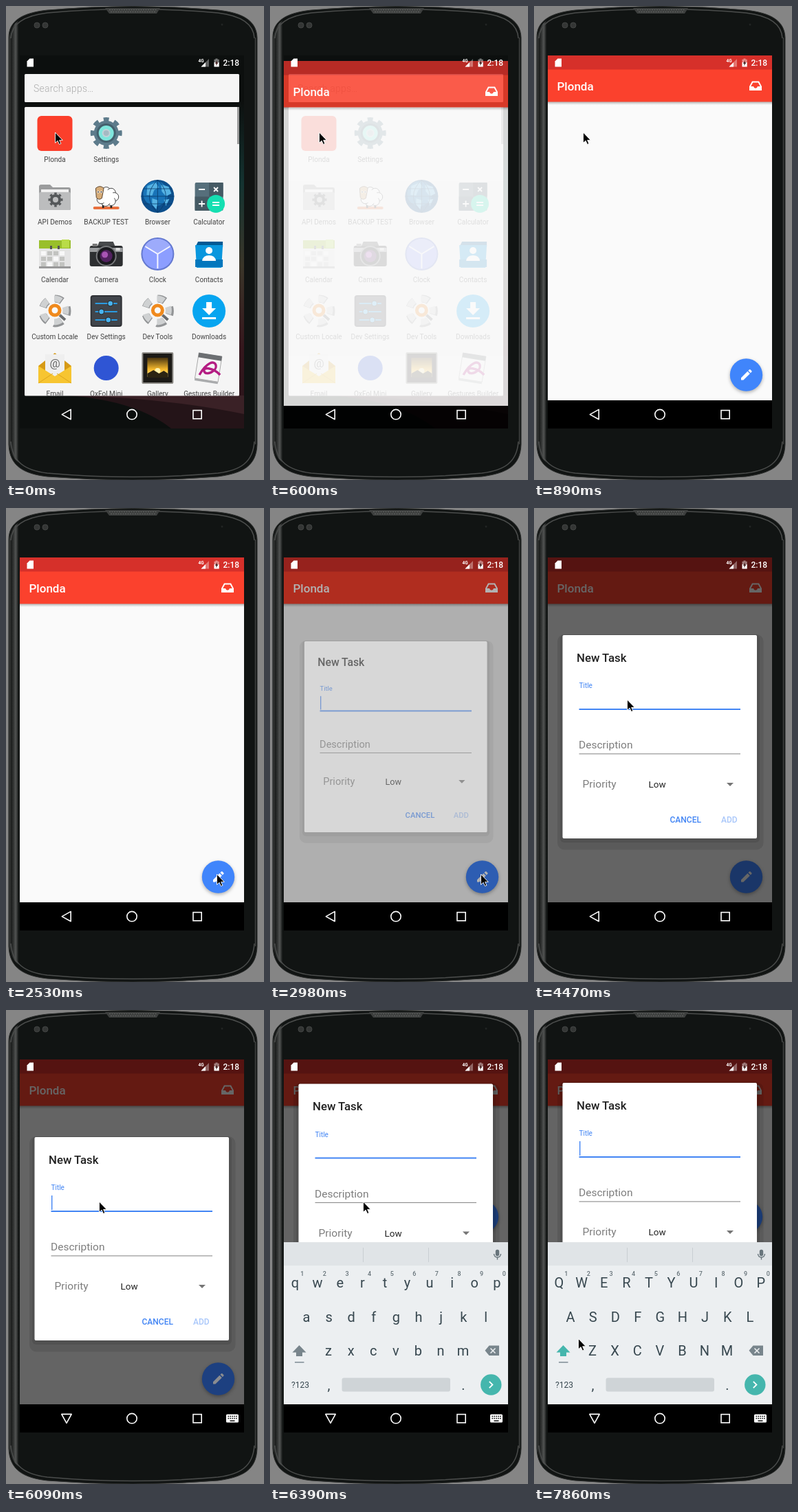
Write an HTML page that moves like this. It is 375 px wide and 690 px high and loops after 8000 ms.

```html
<!DOCTYPE html>
<html lang="en">
<head>
<meta charset="utf-8">
<title>Task app on a phone</title>
<style>
html, body { margin: 0; width: 100%; height: 100%; overflow: hidden; background: #858585; }
svg { display: block; width: 375px; height: 690px; font-family: Roboto, "Noto Sans", sans-serif; }
.mid { text-anchor: middle; }
.med { font-weight: 500; }
#fab circle { filter: drop-shadow(0 2px 2.5px rgba(0,0,0,.3)); }
#dialog { transform-origin: 183px 333px; }
</style>
</head>
<body>
<svg viewBox="0 0 375 690">
  <defs>
    <linearGradient id="rim">
      <stop offset="0" stop-color="#4a4c4b"/><stop offset=".15" stop-color="#1b1d1c"/>
      <stop offset=".4" stop-color="#2c2e2d"/><stop offset=".7" stop-color="#525453"/>
      <stop offset="1" stop-color="#171a19"/>
    </linearGradient>
    <linearGradient id="side" x2="0" y2="1">
      <stop offset="0" stop-color="#0d100f"/><stop offset=".25" stop-color="#143331"/>
      <stop offset=".5" stop-color="#3a3529"/><stop offset=".75" stop-color="#35171d"/>
      <stop offset="1" stop-color="#28141a"/>
    </linearGradient>
    <linearGradient id="drop" x2="0" y2="1">
      <stop offset="0" stop-color="#000" stop-opacity=".3"/><stop offset="1" stop-color="#000" stop-opacity="0"/>
    </linearGradient>
    <linearGradient id="dusk" x2="0" y2="1">
      <stop offset="0" stop-color="#4a3510"/><stop offset=".6" stop-color="#f5b82c"/><stop offset="1" stop-color="#ffe98a"/>
    </linearGradient>
    <clipPath id="screen"><rect x="20" y="72" width="326" height="543"/></clipPath>
    <clipPath id="window"><rect x="20" y="72" width="326" height="502"/></clipPath>
    <clipPath id="drawer"><rect x="27" y="147" width="312" height="420.5"/></clipPath>
  </defs>

  <!-- phone body -->
  <rect width="375" height="690" fill="#858585"/>
  <path d="M4 46C4 21 24 10 60 6Q185-5 308 6C344 10 364 21 365 46V638C364 670 344 680 308 685Q185 695 60 685C26 681 5 670 4 638Z" fill="#111413" stroke="#2b2d2c"/>
  <path d="M5 46Q6 30 18 21V665Q6 654 5 638Z" fill="url(#rim)"/>
  <path d="M7 47C8 25 27 14 60 10Q185-1 308 10C341 14 360 25 361 47M7 634C9 664 28 676 60 680Q185 691 308 680C341 676 359 664 361 634" fill="none" stroke="#4b4d4c" stroke-width="1.5"/>
  <path d="M362.5 46V638" stroke="#404241" stroke-width="1.5"/>
  <path d="M144 3H224L219 11H150Z" fill="#3d3f3e"/>
  <path d="M150 5.5H219M152 8.5H217" stroke="#646665" stroke-dasharray="2 1.5"/>
  <g fill="#343635" stroke="#434544"><circle cx="45" cy="28" r="4"/><circle cx="57" cy="28" r="4"/></g>
  <circle cx="314" cy="27" r="1.5" fill="#222524"/>

  <g clip-path="url(#screen)">
    <g id="home">
      <rect x="20" y="72" width="326" height="543" fill="#0c0f0e"/>
      <rect x="337" y="140" width="9" height="475" fill="url(#side)"/>
      <path d="M92 567Q190 575 240 615H346V567Z" fill="#241418"/>
      <path d="M92 567Q230 570 346 594V567Z" fill="#3a2126"/>
      <rect x="27" y="99" width="312" height="41" rx="1.5" fill="#f5f5f5"/>
      <text x="40" y="125" font-size="14" font-weight="300" letter-spacing=".2" fill="#adadad">Search apps…</text>
      <rect x="27" y="147" width="312" height="420.5" rx="1.5" fill="#f5f5f5"/>
      <rect x="336" y="147" width="3" height="54" fill="#9b9b9b"/>
      <g id="apps" clip-path="url(#drawer)"></g>
    </g>
    <g id="app">
      <rect x="20" y="72" width="326" height="502" fill="#fafafa"/>
      <rect x="20" y="139" width="326" height="5" fill="url(#drop)"/>
      <rect x="20" y="92" width="326" height="47.5" fill="#fb412d"/>
      <rect x="20" y="72" width="326" height="20.5" fill="#d6302a"/>
      <text x="33.5" y="123" font-size="17" class="med" fill="#fff">Plonda</text>
      <path d="M317 109.5H327L331 117V123H313V117ZM318.2 111.5L315.2 117H319Q319.5 119.7 322 119.7T325 117H328.8L325.8 111.5Z" fill="#fff" fill-rule="evenodd"/>
      <rect x="20" y="574" width="326" height="41" fill="#000"/>
    </g>
    <rect id="dim" x="20" y="72" width="326" height="502"/>
    <g id="fab">
      <circle cx="308.5" cy="537" r="23.7"/>
      <path d="M301 541.2L310.4 531.8L313.8 535.2L304.4 544.6H301ZM311.4 530.8L313 529.2Q313.7 528.6 314.4 529.2L316.4 531.2Q317 531.9 316.4 532.6L314.8 534.2Z"/>
    </g>
    <g clip-path="url(#window)">
      <g id="dialog">
        <rect x="34" y="184" width="299.5" height="313.5" rx="10" opacity=".1"/>
        <rect x="38" y="184" width="290" height="303" rx="6" opacity=".1"/>
        <rect x="41.5" y="185" width="282.5" height="296" rx="2" fill="#fff"/>
        <text x="62" y="223.8" font-size="16.8" class="med" fill="#212121">New Task</text>
        <text x="65.5" y="262" font-size="10" fill="#4285f4">Title</text>
        <rect x="65.5" y="292" width="234.5" height="2" fill="#4285f4"/>
        <rect id="caret" x="66" y="270" width="1.4" height="21" fill="#4285f4"/>
        <text x="65" y="350" font-size="15.5" fill="#7d7d7d">Description</text>
        <rect x="65.5" y="357.4" width="234.5" height="1" fill="#808080"/>
        <text x="70.5" y="407" font-size="15.5" fill="#7d7d7d">Priority</text>
        <text x="166.5" y="407" font-size="13.5" fill="#212121">Low</text>
        <path d="M280 400H290L285 405Z" fill="#757575"/>
        <text x="197.5" y="458.4" font-size="12" class="med" fill="#4285f4">CANCEL</text>
        <text x="272" y="458.4" font-size="12" class="med" fill="#a9c7fa">ADD</text>
      </g>
      <g id="board">
        <rect x="20" y="338" width="326" height="236" fill="#eceff1"/>
        <rect x="20" y="338" width="326" height="34" fill="#e0e4e7"/>
        <path d="M135.5 346V367M230.5 346V367" stroke="#c9ced2"/>
        <g fill="none" stroke="#68757c" stroke-width="1.4"><rect x="328.5" y="349.5" width="4" height="8" rx="2" fill="#68757c"/><path d="M325.5 355Q326 360 330.5 360T335.5 355M330.5 360V363.5"/></g>
        <g id="keys"></g>
        <path id="shift" d="M42.5 488L52.5 498.5H47V504H38V498.5H32.5Z"/>
        <rect x="36" y="512" width="13.5" height="1.6" fill="#85929a"/>
        <path d="M318.5 488.5H333V503H318.5L312.5 495.8Z" fill="#78858c"/>
        <path d="M320.5 492.5L327.5 499.5M327.5 492.5L320.5 499.5" stroke="#eceff1" stroke-width="1.6"/>
        <rect x="104.5" y="535.5" width="157.5" height="20" rx="3" fill="#cfd4d7"/>
        <circle cx="321.3" cy="545.5" r="15.2" fill="#45b6ad"/>
        <path d="M318.8 540.8L323.5 545.5L318.8 550.2" fill="none" stroke="#fff" stroke-width="1.8"/>
      </g>
    </g>
    <g fill="#fff">
      <path d="M34.5 76.5H40V88.5H30.5V80.5Z"/>
      <text x="279.5" y="81.5" font-size="6.5" font-weight="700">4G</text>
      <path d="M295 77V88.5H283.5Z" opacity=".35"/><path d="M290 82V88.5H283.5Z"/>
      <path d="M302.5 77.7H304.5V76.5H307.5V77.7H309.7V82H302.5Z" opacity=".45"/>
      <path d="M302.5 82H309.7V88.5H302.5Z"/>
      <path d="M307 79L303.8 83.8H305.8L305 87.2L308.5 82.2H306.4Z" fill="#3a1413"/>
      <text x="315.5" y="87" font-size="12" class="med">2:18</text>
    </g>
    <g fill="none" stroke="#fff" stroke-width="1.6">
      <path id="back" d="M81.3 594.6L94.2 587.4V601.8Z" stroke-linejoin="round"/>
      <circle cx="183" cy="594.6" r="7.2"/>
      <rect x="272" y="588.6" width="12.2" height="12.2"/>
    </g>
    <g id="ime">
      <rect x="320" y="588.5" width="18" height="12" rx="1.5" fill="#fff"/>
      <path d="M322.5 591.5H336M322.5 594.5H336" stroke="#000" stroke-width="1.6" stroke-dasharray="1.6 1.3"/>
      <path d="M325.5 598H332.5" stroke="#000" stroke-width="1.4"/>
    </g>
  </g>
  <path id="mouse" d="M0 0V15.3L3.6 12.1L6 17.4L8.4 16.4L6.1 11.3H10.8Z" stroke="#fff" stroke-width=".9"/>
</svg>

<script>
const $ = id => document.getElementById(id);

// Icon pieces, drawn around 0,0
const disc = (x, y, r, fill, more = '') => `<circle cx="${x}" cy="${y}" r="${r}" fill="${fill}" ${more}/>`;
const box = (x, y, w, h, fill, more = '') => `<rect x="${x}" y="${y}" width="${w}" height="${h}" fill="${fill}" ${more}/>`;
const shape = (d, fill, more = '') => `<path d="${d}" fill="${fill}" ${more}/>`;
const line = (d, color, width) => shape(d, 'none', `stroke="${color}" stroke-width="${width}"`);
const ring = (x, y, r, color, width, more = '') => disc(x, y, r, 'none', `stroke="${color}" stroke-width="${width}" ${more}`);
const teeth = (x, y, r, n, color, width) => ring(x, y, r, color, width, `pathLength="${2 * n}" stroke-dasharray="1 1" stroke-dashoffset=".5"`);
const gear = (x, y, r, n, color, width) => disc(x, y, r, color) + teeth(x, y, r, n, color, width);

const tools = teeth(0, 0, 18, 5, '#929496', 11) + teeth(-1, -1, 17, 5, '#cfd1d2', 9) + line('M5 4L15 13', '#6a6c6e', 4) +
  disc(0, -1, 10, '#fafafa') + ring(0, -1, 7, '#f08a1d', 5);

const wool = [[-8, -4], [0, -8], [8, -6], [13, 1], [8, 8], [-1, 9], [-8, 5]];
const sheep = box(-19, 15, 38, 4, '#e8703f', 'rx="2"') + '<g transform="scale(.9)">' + line('M-5 10V19M8 10V19', '#222', 3) +
  wool.map(([x, y]) => disc(x, y, 7, '#fff', 'stroke="#333"')).join('') + disc(2, 1, 11, '#fff') +
  shape('M-17-13Q-10-19-4-13L-7 3Q-12 7-16 2Z', '#d6ac78', 'stroke="#4d3620"') +
  disc(-13, -7, 2, '#fff') + disc(-8, -7, 2, '#fff') + disc(-13, -7, 1, '#111') + disc(-8, -7, 1, '#111') + '</g>';

const globe = disc(0, 0, 24, '#0d4f8c') + disc(-3, -4, 18, '#1974b8') +
  shape('M-15-15L-3-20L2-13L-5-9L-8-1L-16-2ZM5-17L16-14L20-4L12 0L6-7ZM-8 3L1 6L-2 19L-8 12ZM9 5L17 4L12 14Z', '#55b2e3') +
  line('M-24 0H24M-21-11H21M-21 11H21M0-24V24M0-24Q-24 0 0 24M0-24Q24 0 0 24', '#083a6b', .8);

const calendar = box(-23, -20, 46, 40, '#e4e4e4') + box(-23, -20, 46, 12, '#99bf2b') + box(10, -21, 11, 12, '#b9dc48') +
  [-15, -6, 3, 12].map((x, i) => [-4, 4, 12].map((y, j) => box(x - 5, y, 7, 6, (i + j) % 3 ? '#c2c3c0' : '#f8f8f8')).join('')).join('') +
  box(-7, -12, 3, 5, '#555') + box(4, -12, 3, 5, '#555') + box(-23, 18, 46, 3, '#999');

const camera = shape('M-10-18H10L13-11H-13Z', '#47494b') + box(-24, -12, 48, 30, '#2d2f31', 'rx="3"') +
  box(-24, -9, 48, 6, '#9b9d9f') + disc(0, 3, 15, '#77797b') + disc(0, 3, 13, '#1a1a1e') +
  disc(0, 3, 9, '#51215f') + disc(-2, 1, 4.5, '#a954b5') + box(-20, -15, 7, 4, '#777') + box(14, -9, 6, 4, '#ddd');

const art = {
  folder: shape('M-23-14Q-23-17-20-17H-7L-3-13H20Q23-13 23-10V18Q23 20 20 20H-20Q-23 20-23 18Z', '#9b9c9d') +
    box(-20, -10, 40, 10, '#f0f0f0') + box(-23, -6, 46, 26, '#bcbdbe', 'rx="2"') + gear(1, 5, 8, 8, '#55585a', 5) + disc(1, 5, 4, '#bcbdbe'),
  cog: gear(0, 0, 18, 8, '#5d7b8b', 10) + disc(0, 0, 14, '#44606d') + disc(0, 0, 11, '#7fe6dd') + disc(0, 0, 6, '#c3d2d8') + disc(0, 0, 4, '#a5bac3'),
  calc: box(-20.5, -20, 41, 41, '#566f7b', 'rx="2"') + box(0, -20, 20.5, 20.5, '#455a64') + box(-20.5, .5, 20.5, 20.5, '#455a64') +
    line('M-15-10H-6M-15 11H-6M-10.5 6.5V15.5M7-13L13-7M13-13L7-7', '#fff', 1.8) + disc(10, 11, 13, '#15dfb1') + line('M5 9H15M5 13H15', '#fff', 1.8),
  clock: disc(0, 0, 24, '#6479d0') + disc(0, 0, 22, '#8c9eff') + shape('M0 0L-19-11A22 22 0 0 1 19-11Z', '#9dabfb') + line('M0 21V0L-18-11M0 0L18-11', '#f4f5ff', 2),
  card: shape('M-16-18H20V-10H-20Z', '#015a94') + shape('M-20-13H20L18 20H-18Z', '#0a97de') + box(-20, 8, 40, 11, '#0277bd') + disc(0, -5, 5, '#fff') + shape('M-10 10Q-9 2 0 2T10 10Z', '#fff'),
  sliders: box(-23, -23, 46, 46, '#303236', 'rx="4"') + box(-21, -21, 42, 42, '#41454b', 'rx="3"') +
    line('M-16-11H16M-16 1H16M-16 13H16', '#2b9be0', 2) + [[6, -11], [-7, 1], [3, 13]].map(([x, y]) => disc(x, y, 4, '#49b3f0', 'stroke="#222"')).join(''),
  load: disc(0, 0, 24, '#07a5f0') + shape('M-4-13H4V-4H10L0 6L-10-4H-4Z', '#fff') + box(-10, 9, 20, 3, '#fff'),
  mail: shape('M-24-3L0-22L24-3V22H-24Z', '#d69a16') + box(-14, -20, 28, 32, '#efefef') + '<text class="mid" y="-1" font-size="17" fill="#666">@</text>' +
    shape('M-24-3L0 12L24-3V22H-24Z', '#f7c531') + line('M-24 22L-3 8M24 22L3 8', '#dda51e', 1),
  photo: box(-23, -23, 46, 46, '#8d8b86', 'rx="2"') + box(-21, -21, 42, 42, '#1c1a17') + box(-15, -15, 30, 28, 'url(#dusk)') +
    disc(0, 4, 4, '#fff3b0') + shape('M-15 8L-6 3L2 8L9 4L15 8V14H-15Z', '#2b2413'),
  pad: '<g transform="rotate(9)">' + box(-18, -17, 34, 38, '#a9abad') + box(-18, -19, 34, 37, '#f4f4f4', 'stroke="#aaa"') + box(-18, -20, 34, 7, '#6c6f72') +
    '</g>' + line('M-14 10C-4-8 8-12 10-4S-4 12-7 5S6-1 16 10', '#b41d83', 3.4)
};

const grid = [
  [185, ['Plonda', box(-25.5, -25, 51, 51, '#fb3f2b', 'rx="6"')], ['Settings', art.cog]],
  [277, ['API Demos', art.folder], ['BACKUP TEST', sheep], ['Browser', globe], ['Calculator', art.calc]],
  [361, ['Calendar', calendar], ['Camera', camera], ['Clock', art.clock], ['Contacts', art.card]],
  [444, ['Custom Locale', tools], ['Dev Settings', art.sliders], ['Dev Tools', tools], ['Downloads', art.load]],
  [527, ['Email', art.mail], ['OxFol Mini', disc(0, 0, 18, '#2f55d4')], ['Gallery', art.photo], ['Gestures Builder', art.pad]]
];
$('apps').innerHTML = grid.map(([y, ...row]) => row.map(([name, icon], i) =>
  `<g transform="translate(${71 + 74.7 * i} ${y})">${icon}<text class="mid" y="${y < 200 ? 41.5 : 40.5}" font-size="10.1" fill="#444">${name}</text></g>`
).join('')).join('');

// Keyboard letters
const rows = [['qwertyuiop', 36.5, 404], ['asdfghjkl', 53, 454], ['zxcvbnm', 85, 503]];
const key = (x, y, size, s, more = '') => `<text class="mid" x="${x}" y="${y}" font-size="${size}" fill="#37474f" ${more}>${s}</text>`;
$('keys').innerHTML = rows.map(([s, x, y]) => [...s].map((c, i) => key(x + 32.6 * i, y, 20, c, 'data-letter')).join('')).join('') +
  [...'1234567890'].map((c, i) => key(46.8 + 32.6 * i, 387, 9, c, 'font-weight="500" opacity=".75"')).join('') +
  key(44, 550, 12, '?123') + key(85.5, 553, 20, ',') + key(281, 553, 20, '.');
const letters = [...document.querySelectorAll('[data-letter]')];

// Each step changes only the listed values; paint is button and pencil
const bright = ['#4085fb', '#fff'], dark = ['#1a3668', '#666'], lit = ['#1d4080', '#8a8c90'];
const steps = [
  [0, { mouse: [71.5, 184], app: 0, rise: 0, fab: 0, paint: bright, dim: 0, dialog: 0, scale: 1, lift: 0, caret: 1, turn: 0, ime: 0, board: 0, drop: 0, fabLift: 0, caps: 0 }],
  [450, { app: .35, rise: 32 }],
  [600, { app: .85, rise: 8 }],
  [740, { app: 1, rise: 0, fab: .5 }],
  [890, { fab: 1 }],
  [1780, { mouse: [190, 385] }],
  [1930, { mouse: [273, 519] }],
  [2230, { mouse: [285, 525] }],
  [2380, { mouse: [298, 530] }],
  [2530, { mouse: [306.5, 533] }],
  [2980, { dim: .3, dialog: .5, scale: .94, paint: ['#2d5db2', '#b2b2b2'] }],
  [3130, { dim: .6, dialog: 1, scale: 1, paint: dark }],
  [3430, { mouse: [262, 462], caret: 0 }],
  [3580, { mouse: [190, 355] }],
  [3720, { mouse: [146, 293] }],
  [3870, { mouse: [135.5, 279], caret: 1 }],
  [4470, { caret: 0 }],
  [4920, { caret: 1 }],
  [5360, { caret: 0 }],
  [5510, { turn: 15 }],
  [5660, { turn: 40, ime: 1 }],
  [5800, { turn: 65, caret: 1 }],
  [5950, { turn: 83, paint: lit }],
  [6090, { turn: 90 }],
  [6240, { caret: 0, board: .6, drop: 60, lift: 42, fabLift: 236 }],
  [6390, { board: 1, drop: 0, lift: 77.5 }],
  [6540, { lift: 79 }],
  [6690, { caret: 1 }],
  [6840, { mouse: [128, 304] }],
  [6980, { mouse: [108, 362] }],
  [7130, { mouse: [80, 426] }],
  [7270, { mouse: [55, 470], caret: 0 }],
  [7420, { mouse: [42, 491] }],
  [7570, { mouse: [38, 497] }],
  [7710, { mouse: [50, 488], caps: 1, caret: 1 }],
  [7860, { mouse: [64.5, 478.5] }]
];
const stateAt = t => Object.assign({}, ...steps.filter(s => s[0] <= t).map(s => s[1]));
const fade = (id, value) => $(id).setAttribute('opacity', value);
const move = (id, x, y) => $(id).setAttribute('transform', `translate(${x} ${y})`);

function draw(t) {
  const s = stateAt(t);
  move('mouse', ...s.mouse);
  fade('app', s.app);
  move('app', 0, s.rise);
  fade('fab', s.fab);
  move('fab', 0, -s.fabLift);
  [...$('fab').children].forEach((part, i) => part.setAttribute('fill', s.paint[i]));
  fade('dim', s.dim);
  fade('dialog', s.dialog);
  $('dialog').style.transform = `translateY(${-s.lift}px) scale(${s.scale})`;
  fade('caret', s.caret);
  fade('board', s.board);
  move('board', 0, s.drop);
  fade('ime', s.ime);
  $('back').setAttribute('transform', `rotate(${-s.turn} 88 594.6)`);
  $('shift').setAttribute('fill', s.caps ? '#45b6ad' : '#78858c');
  for (const l of letters) l.textContent = s.caps ? l.textContent.toUpperCase() : l.textContent.toLowerCase();
}

const start = performance.now();
function tick() {
  draw((performance.now() - start) % 8000);
  requestAnimationFrame(tick);
}
tick();
</script>
</body>
</html>
```
